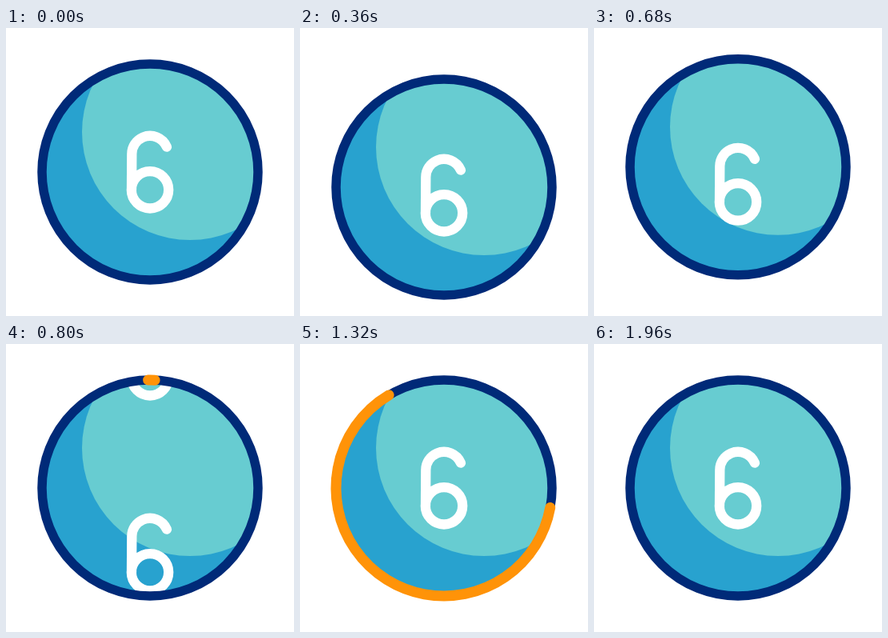
An HTML page with a canvas for the animation above (2 s loop, 360x360 px).

```html
<!DOCTYPE html>
<html lang="en">
<head>
<meta charset="utf-8">
<title>Bouncing ball counter</title>
<style>
html, body { margin: 0; width: 100%; height: 100%; overflow: hidden; background: #fff; }
canvas { display: block; width: 360px; height: 360px; }
</style>
</head>
<body>
<canvas id="stage" width="360" height="360"></canvas>
<script>
const LOOP = 2000, STEP = 40, SPACING = 244, RADIUS = 135;
const NAVY = '#002a78', BLUE = '#28a2cf', TEAL = '#67ccd1', ORANGE = '#ff9308';
const ctx = document.getElementById('stage').getContext('2d');
ctx.lineCap = ctx.lineJoin = 'round';

// Eased progress from 0 to 1 between two times
function ease(t, from, to) {
  const u = Math.min(1, Math.max(0, (t - from) / (to - from)));
  return u * u * (3 - 2 * u);
}

// Cubic segment between [time, value, speed] points
function cubic(t, [t0, p0, v0], [t1, p1, v1]) {
  const d = t1 - t0, u = (t - t0) / d;
  const s = u * u * (3 - 2 * u);
  return p0 + (p1 - p0) * s + d * (v0 * u * (1 - u) ** 2 - v1 * u * u * (1 - u));
}

// Down, up and back to rest
const bounce = (t, down, up) =>
  down * ease(t, 140, 360) - (down + up) * ease(t, 360, 560) + up * ease(t, 560, 760);

const roll = [[560, -34.8, 0.15], [800, 83, 0.45], [1000, 166, 0.41], [1240, SPACING, 0]];

function digitOffset(t) {
  if (t < 560) return bounce(t, 29, 34.8);
  for (let i = 1; i < roll.length; i++) {
    if (t < roll[i][0]) return cubic(t, roll[i - 1], roll[i]);
  }
  return SPACING;
}

function disc(x, y, r, color) {
  ctx.fillStyle = color;
  ctx.beginPath();
  ctx.arc(x, y, r, 0, Math.PI * 2);
  ctx.fill();
}

// Arc on the rim, in degrees clockwise from the top
function rim(from, to, width, color) {
  const rad = deg => (deg - 90) * Math.PI / 180;
  ctx.strokeStyle = color;
  ctx.lineWidth = width;
  ctx.beginPath();
  ctx.arc(180, 180, RADIUS, rad(from), rad(to));
  ctx.stroke();
}

function six(dy) {
  ctx.strokeStyle = '#fff';
  ctx.lineWidth = 12.3;
  ctx.beginPath();
  ctx.arc(180, 157.5 + dy, 22.7, -0.4, -Math.PI, true);
  ctx.lineTo(157, 202 + dy);
  ctx.arc(180, 202.3 + dy, 23.2, Math.PI, -Math.PI, true);
  ctx.stroke();
}

function draw(t) {
  ctx.fillStyle = '#fff';
  ctx.fillRect(0, 0, 360, 360);

  const ballY = bounce(t, 19, 17.5);
  const digitY = digitOffset(t);
  ctx.save();
  ctx.translate(0, ballY);
  ctx.save();
  ctx.beginPath();
  ctx.arc(180, 180, RADIUS, 0, Math.PI * 2);
  ctx.clip();
  disc(180, 180, RADIUS + 1, BLUE);
  disc(230, 130, 135, TEAL);
  six(digitY - ballY);
  six(digitY - ballY - SPACING);
  ctx.restore();

  rim(0, 360, 11.5, NAVY);
  const head = 360 * ease(t, 760, 1440);
  const tail = 360 * ease(t, 1082, 1762);
  if (head - tail > 0.05) rim(tail - 1, head - 1, 13, ORANGE);
  ctx.restore();
}

const start = performance.now();
function tick() {
  const t = (performance.now() - start) % LOOP;
  draw(Math.floor(t / STEP) * STEP);
  requestAnimationFrame(tick);
}
tick();
</script>
</body>
</html>
```
